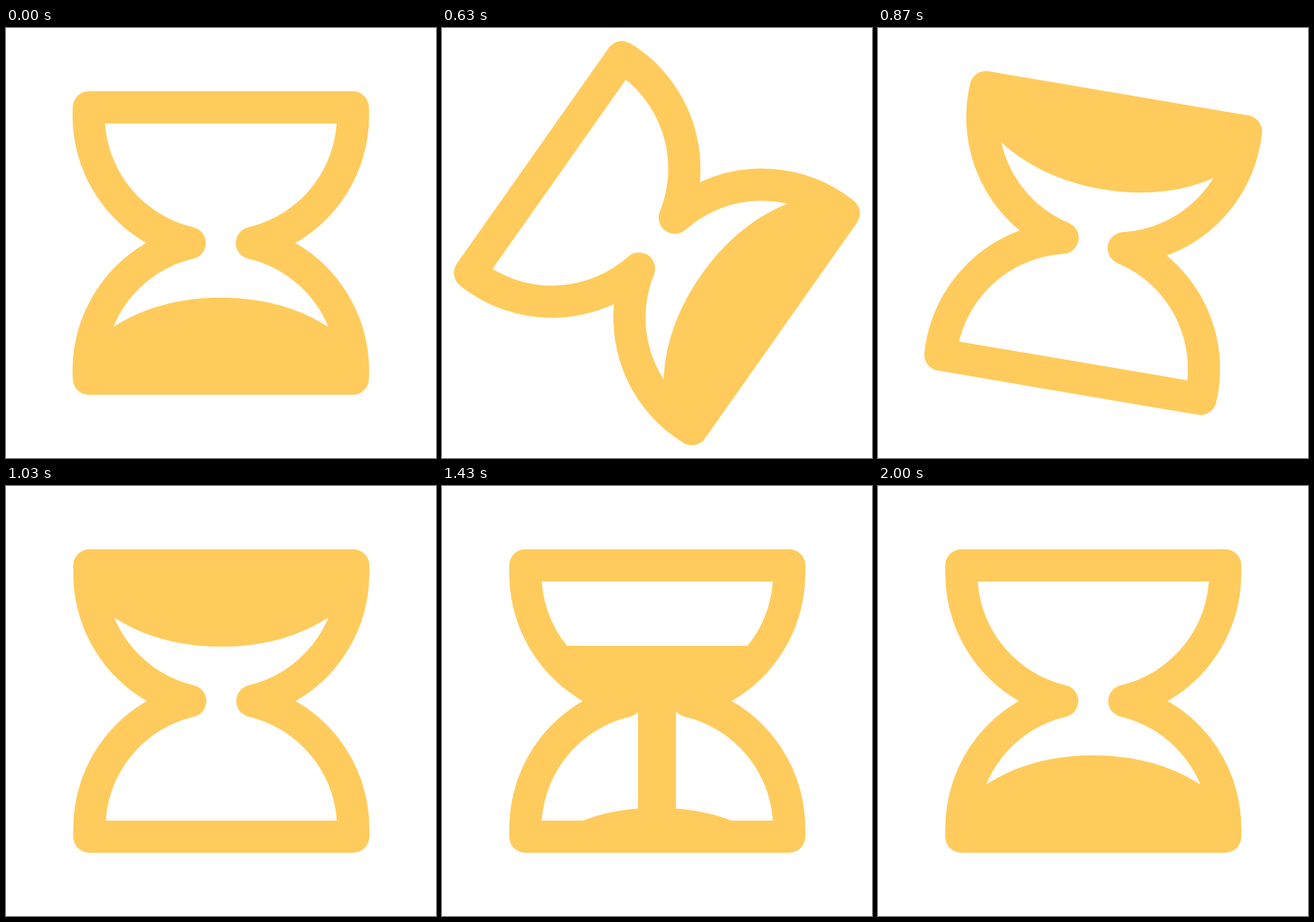
Recreate the animation shown at these times as an HTML page. Size 748 by 748 pixels, loop 2.03 s.

```html
<!DOCTYPE html>
<html lang="en">
<head>
<meta charset="utf-8">
<title>Hourglass</title>
<style>
  html, body { margin: 0; width: 100%; height: 100%; overflow: hidden; background: #fff; }
  svg { display: block; width: 100%; height: 100%; fill: #ffcb5d; }
  #glass { fill: none; stroke: #ffcb5d; stroke-width: 56; stroke-linejoin: round; }
</style>
</head>
<body>
<svg viewBox="-374 -374 748 748">
  <defs>
    <clipPath id="inside"><path id="hollow"/></clipPath>
    <path id="dome" d="M-245 93 L-201 61 C-141 16.6 -69.6 0 0 0 S141 16.6 201 61 L245 93 V117 H-245 Z"/>
  </defs>
  <g id="spin">
    <g clip-path="url(#inside)">
      <use id="upper" href="#dome"/>
      <use id="lower" href="#dome"/>
    </g>
    <path id="stream"/>
    <path id="glass"/>
  </g>
</svg>
<script>
const LOOP = 2030, FPS = 30;
const SPIN_START = 15, SPIN_FRAMES = 15, POUR_START = 31;
const APEX = 94.5, DOME_HEIGHT = 117;

const el = id => document.getElementById(id);
const set = (id, name, value) => el(id).setAttribute(name, value);
const clamp = u => Math.min(1, Math.max(0, u));
const smooth = u => { u = clamp(u); return u * u * (3 - 2 * u); };

const cubic = (a, b, s) => 3 * a * s * (1 - s) ** 2 + 3 * b * s * s * (1 - s) + s ** 3;

function bezier(x1, y1, x2, y2, u) {
  if (u <= 0 || u >= 1) return clamp(u);
  let lo = 0, hi = 1;
  for (let i = 0; i < 30; i++) {
    const mid = (lo + hi) / 2;
    if (cubic(x1, x2, mid) < u) lo = mid; else hi = mid;
  }
  return cubic(y1, y2, lo);
}

// Two bowls meeting at the neck; the sides are straight beyond height k.
function outline(r, k) {
  const arc = (x, y) => `A${r} ${r} 0 0 1 ${x} ${y}`;
  const w = 229.5, h = 236;
  return `M-54 0 ${arc(-w, -k)} V${-h} H${w} V${-k} ${arc(54, 0)}` +
         `${arc(w, k)} V${h} H${-w} V${k} ${arc(-54, 0)} Z`;
}

const turning = outline(227.6, 236);
const standing = outline(227.6, 221.6);

function setGlass(d) {
  set('glass', 'd', d);
  set('hollow', 'd', d);
}

function drawSpin(n) {
  const turn = bezier(.236, 0, .52, 1.133, (n - SPIN_START) / SPIN_FRAMES);
  setGlass(turning);
  set('spin', 'transform', `rotate(${-180 * turn}) translate(-.3 0)`);
  set('lower', 'transform', `translate(0 ${APEX + .4})`);
  set('upper', 'visibility', 'hidden');
  set('stream', 'd', '');
}

function drawPour(n) {
  const drop = 261 * smooth((n - POUR_START) / 26);
  const surface = drop - APEX - DOME_HEIGHT;
  const top = n < 50 ? surface : -9.5 + 13 * (n - 49);
  const bottom = -104 + 330 * smooth((n - POUR_START) / 11.5);
  const sink = 115 * (1 - smooth((n - 36) / 24));

  setGlass(standing);
  set('spin', 'transform', 'translate(.5 0)');
  set('upper', 'transform', `translate(0 ${drop - APEX}) scale(1 -1)`);
  set('upper', 'visibility', surface < -27 ? 'visible' : 'hidden');
  set('lower', 'transform', `translate(0 ${APEX + sink})`);
  set('stream', 'd', `M-33.5 ${bottom} V${top + 33} a33 33 0 0 1 66 0 V${bottom} Z`);
}

function render() {
  const t = performance.now() % LOOP;
  const n = Math.floor((t + 3.4) * FPS / 1000);
  if (n < POUR_START) drawSpin(n); else drawPour(n);
  requestAnimationFrame(render);
}
render();
</script>
</body>
</html>
```
